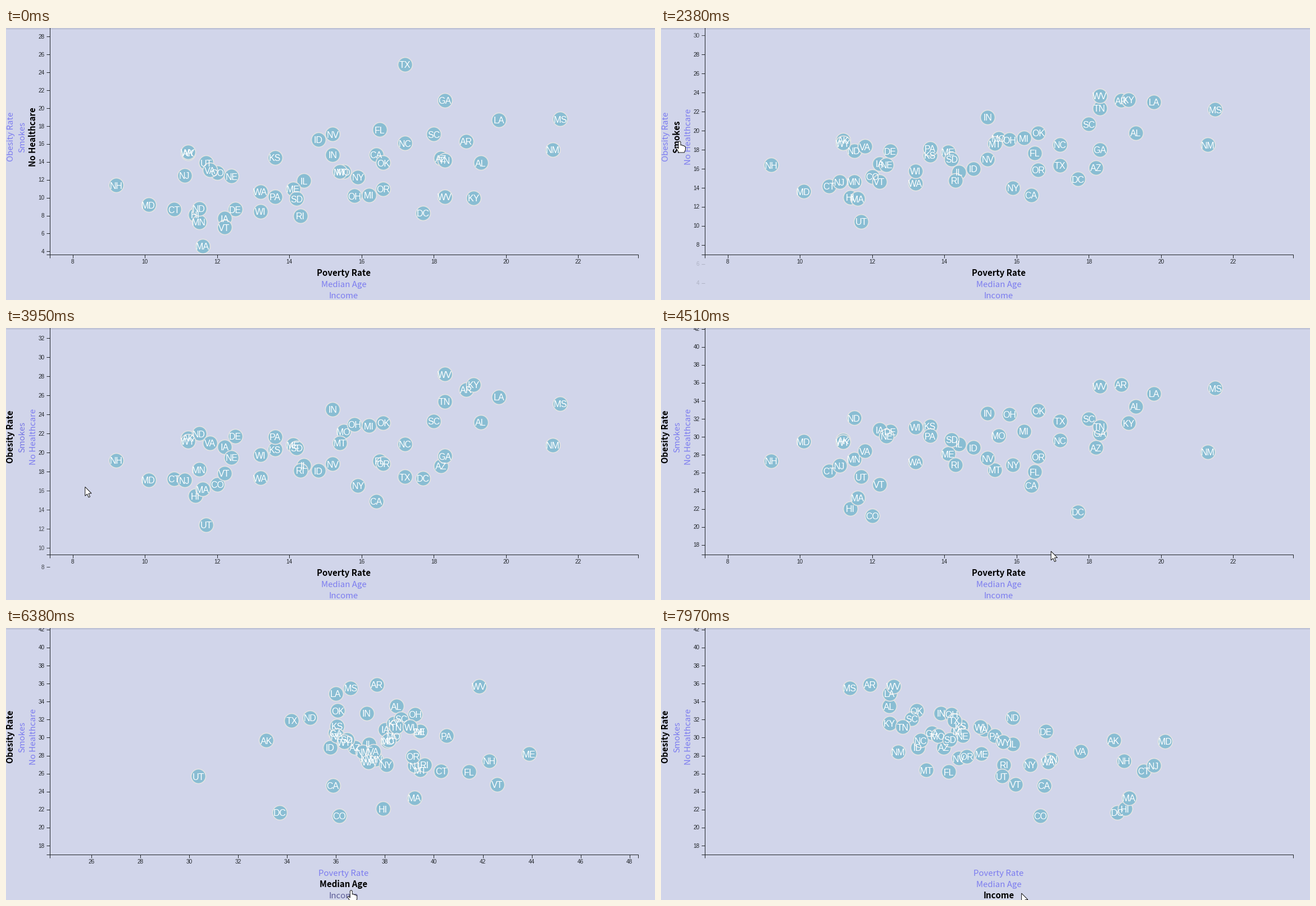
Animation of 1155x485 px, one loop 8000 ms. Source, as a matplotlib script:

```python
import numpy as np
import matplotlib.pyplot as plt
from matplotlib.animation import FuncAnimation
from matplotlib.patches import Polygon

W, H, DPI = 1155, 485, 80
PX = 72 / DPI                      # points per pixel
LOOP, STEP = 8000, 50
DURATION = 1050                    # length of one axis transition
BG, INK, LINK = "#d1d5ea", "#212529", "#7d7df0"
LEFT, RIGHT, BASE, TOP = 77.5, 1124.5, 403.5, -14.5

STATES = ("AL AK AZ AR CA CO CT DE DC FL GA HI ID IL IN IA KS KY LA ME MD MA MI "
          "MN MS MO MT NE NV NH NJ NM NY NC ND OH OK OR PA RI SC SD TN TX UT VT "
          "VA WA WV WI WY").split()

DATA = {
    "poverty": [19.3, 11.2, 18.2, 18.9, 16.4, 12, 10.8, 12.5, 17.7, 16.5, 18.3,
                11.4, 14.8, 14.4, 15.2, 12.2, 13.6, 19.1, 19.8, 14.1, 10.1, 11.6,
                16.2, 11.5, 21.5, 15.5, 15.4, 12.4, 15.2, 9.2, 11.1, 21.3, 15.9,
                17.2, 11.5, 15.8, 16.6, 16.6, 13.6, 14.3, 18, 14.2, 18.3, 17.2,
                11.7, 12.2, 11.8, 13.2, 18.3, 13.2, 11.2],
    "age": [38.6, 33.3, 36.9, 37.8, 36, 36.3, 40.5, 39.6, 33.8, 41.6, 36.1,
            38.1, 35.9, 37.5, 37.4, 38.2, 36.2, 38.5, 36.1, 44.1, 38.3, 39.4,
            39.6, 37.8, 36.7, 38.5, 39.6, 36.2, 37.4, 42.5, 39.4, 37.2, 38.2,
            38.3, 35.1, 39.4, 36.2, 39.3, 40.7, 39.8, 38.8, 36.6, 38.6, 34.3,
            30.5, 42.8, 37.7, 37.5, 42, 39.2, 36.5],
    "income": [42830, 71583, 50068, 41262, 61933, 61303, 70048, 59716, 71648,
               47463, 49321, 69592, 47861, 57444, 49446, 53712, 52504, 42958,
               44555, 49462, 73971, 69160, 49847, 61481, 39680, 48363, 46328,
               52686, 51450, 66532, 71919, 44803, 58878, 46556, 59029, 49308,
               47529, 51075, 53234, 54891, 45238, 50979, 44361, 53035, 60922,
               54166, 64902, 61366, 41059, 52622, 57055],
    "healthcare": [13.9, 15, 14.4, 16.3, 14.8, 12.8, 8.7, 8.7, 8.3, 17.6, 20.9,
                   8.1, 16.5, 11.9, 14.8, 7.7, 14.5, 10, 18.7, 11, 9.2, 4.6,
                   10.3, 7.3, 18.8, 12.9, 12.9, 12.4, 17.1, 11.4, 12.5, 15.4,
                   12.3, 16.1, 8.8, 10.2, 13.9, 11, 10.1, 8, 17.1, 9.9, 14.2,
                   24.9, 13.9, 6.7, 13.1, 10.7, 10.1, 8.5, 15.1],
    "smokes": [21.1, 19.9, 16.5, 24.7, 12.9, 15.7, 15.4, 19.9, 16.4, 17.7, 17.4,
               14.1, 15.9, 16.5, 22.9, 18.5, 18.1, 26.2, 24, 19.3, 14.6, 14.7,
               21.2, 16.3, 23, 20.6, 19.9, 17.3, 17, 17.5, 15.1, 19.2, 14.4,
               19.1, 19.9, 21, 21.1, 17, 19.9, 16.3, 21.5, 18.6, 24.2, 14.5,
               9.7, 16.4, 19.5, 15.3, 26.7, 17.4, 19.5],
    "obesity": [33.5, 29.7, 28.9, 35.9, 24.7, 21.3, 26.3, 30.7, 21.7, 26.2, 30.5,
                22.1, 28.9, 29.3, 32.7, 30.9, 31.3, 31.6, 34.9, 28.2, 29.6, 23.3,
                30.7, 27.6, 35.5, 30.2, 26.4, 30.2, 27.7, 27.4, 26.9, 28.4, 27,
                29.7, 32.2, 32.6, 33, 27.9, 30.2, 27, 32.1, 29.8, 31.2, 31.9,
                25.7, 24.8, 28.5, 27.3, 35.7, 31.2, 29.5],
}
DATA = {key: np.array(column) for key, column in DATA.items()}

AXES = {"x": ("poverty", "age", "income"), "y": ("healthcare", "smokes", "obesity")}
# axis -> (hover time, click time, chosen variable)
CLICKS = {"x": [(5130, 5425, "age"), (6250, 7330, "income")],
          "y": [(1550, 1697, "smokes"), (3420, 3591, "obesity")]}
LABELS = {  # text, anchor, rotation
    "poverty": ("Poverty Rate", (601, 442), 0),
    "age": ("Median Age", (601, 462), 0),
    "income": ("Income", (601, 482), 0),
    "healthcare": ("No Healthcare", (53, 194), 90),
    "smokes": ("Smokes", (33.5, 194), 90),
    "obesity": ("Obesity Rate", (13.5, 194), 90),
}

POINTERS = {
    "arrow": [(0, 0), (0, 16), (3.7, 12.7), (6.3, 18.6), (8.8, 17.5),
              (6.2, 11.7), (11.3, 11.5)],
    "hand": [(-1, 0), (1, 0), (2, 1.5), (2, 7), (4.5, 6.5), (5.5, 8), (7.5, 7.5),
             (8.5, 9), (10, 9), (10.5, 11), (10.5, 15), (8.5, 20), (-1.5, 20),
             (-4, 15.5), (-6.5, 12), (-5.5, 10.5), (-4, 11), (-2, 13), (-2, 1.5)],
    "beam": [(-4, -8), (4, -8), (4, -7), (.6, -6.5), (.6, 6.5), (4, 7), (4, 8),
             (-4, 8), (-4, 7), (-.6, 6.5), (-.6, -6.5), (-4, -7)],
}
PATH = [  # time, x, y, pointer from then on
    (100, 867, 412, "arrow"), (450, 430, 330, "arrow"), (800, 72, 178, "arrow"),
    (930, 72, 180, "arrow"), (1250, 50, 172, "arrow"), (1550, 33, 200, "hand"),
    (1700, 33, 202, "hand"), (2750, 33, 202, "hand"), (2950, 5, 196, "arrow"),
    (3050, -2, 194, "arrow"), (3300, 2, 196, "arrow"), (3420, 8, 200, "hand"),
    (3720, 8, 200, "hand"), (3900, 60, 240, "arrow"), (4230, 470, 460, "arrow"),
    (4510, 694, 398, "arrow"), (4700, 698, 400, "arrow"), (5130, 630, 453, "hand"),
    (5425, 632, 457, "beam"), (6000, 632, 457, "beam"), (6250, 616, 467, "hand"),
    (6380, 614, 468, "hand"), (6700, 601, 474, "hand"), (7000, 602, 474, "hand"),
    (7200, 597, 462, "hand"), (7330, 602, 470, "beam"), (7650, 618, 473, "arrow"),
    (7970, 642, 473, "arrow"),
]
PATH_T, PATH_X, PATH_Y, PATH_KIND = zip(*PATH)


def domain(key):
    pad = 1.1 if key in AXES["x"] else 1.2
    return DATA[key].min() * 0.8, DATA[key].max() * pad


def scale(key, values):
    lo, hi = domain(key)
    start, end = (LEFT, RIGHT) if key in AXES["x"] else (BASE, TOP)
    return start + (end - start) * (np.asarray(values) - lo) / (hi - lo)


def ticks(key):
    step = 5000 if key == "income" else 2
    lo, hi = domain(key)
    return [int(v) for v in np.arange(np.ceil(lo / step) * step, hi, step)]


def cubic(p):
    p = min(max(p, 0), 1)
    return 4 * p ** 3 if p < 0.5 else 1 - 4 * (1 - p) ** 3


def transition(axis, t):
    """Previous variable, current variable and eased progress."""
    old = new = AXES[axis][0]
    progress = 1
    for _, click, key in CLICKS[axis]:
        if t >= click:
            old, new, progress = new, key, cubic((t - click) / DURATION)
    return old, new, progress


def mix(a, b, p):
    p = min(max(p, 0), 1)
    a, b = (np.array([int(c[i:i + 2], 16) for i in (1, 3, 5)]) for c in (a, b))
    return tuple((a + (b - a) * p) / 255)


fig = plt.figure(figsize=(W / DPI, H / DPI), dpi=DPI, facecolor=BG)
ax = fig.add_axes([0, 0, 1, 1])
ax.set(xlim=(0, W), ylim=(H, 0))
ax.axis("off")


def line(xs, ys, color=INK, z=2):
    return ax.plot(xs, ys, color=color, lw=PX, zorder=z, solid_capstyle="butt")[0]


def text(x, y, s, size, color, **kw):
    kw = {"ha": "center", "va": "baseline", "family": "Liberation Sans", **kw}
    return ax.text(x, y, s, fontsize=size * PX, color=color, **kw)


line([0, W], [0.5, 0.5], "#a9acc0")
line([LEFT, LEFT, RIGHT, RIGHT], [BASE + 6, BASE, BASE, BASE + 6])
line([LEFT - 6, LEFT, LEFT], [BASE, BASE, -2])

marks = {"x": {}, "y": {}}
for axis, keys in AXES.items():
    for value in sorted({v for key in keys for v in ticks(key)}):
        label = text(0, 419.6, f"{value:,}", 10, INK,
                     ha="center" if axis == "x" else "right")
        marks[axis][value] = line([0, 0], [0, 0]), label

names = {key: text(*pos, s, 15, LINK, family="Noto Sans CJK JP", rotation=turn,
                   rotation_mode="anchor", zorder=3)
         for key, (s, pos, turn) in LABELS.items()}

dots = ax.scatter(np.zeros(len(STATES)), np.zeros(len(STATES)), s=(26 * PX) ** 2,
                  c="#89bdd3", edgecolors="#e3e3e3", linewidths=1.7 * PX, zorder=4)
codes = [text(0, 0, s, 16, "white", zorder=5) for s in STATES]

pointers = {kind: Polygon(shape, closed=True, fc="black" if kind == "beam" else "white",
                          ec="white" if kind == "beam" else "black",
                          lw=(0.4 if kind == "beam" else 0.9) * PX, zorder=9)
            for kind, shape in POINTERS.items()}
for patch in pointers.values():
    ax.add_patch(patch)


def draw_ticks(axis, old, new, p):
    before, after = ticks(old), ticks(new)
    for value, (mark, label) in marks[axis].items():
        pos = (1 - p) * scale(old, value) + p * scale(new, value)
        alpha = (1 - p) * (value in before) + p * (value in after)
        shown = alpha > 0.01 and -20 < pos < W + 20
        mark.set_visible(shown)
        label.set_visible(shown)
        if not shown:
            continue
        if axis == "x":
            mark.set_data([pos, pos], [BASE, BASE + 6])
            label.set_x(pos)
        else:
            mark.set_data([LEFT - 6, LEFT], [pos, pos])
            label.set_position((LEFT - 9, pos + 3.5))
        mark.set_alpha(alpha)
        label.set_alpha(alpha)


def draw_labels(axis, active, t):
    for key in AXES[axis]:
        names[key].set(color="black" if key == active else LINK,
                       weight="bold" if key == active else 300)
    previous = AXES[axis][0]
    for hover, click, key in CLICKS[axis]:
        if hover <= t < click:
            names[key].set_color(mix(LINK, "#444455", (t - hover) / 200))
        if click <= t < click + 400:
            names[previous].set_color(mix("#222233", LINK, (t - click) / 400))
        previous = key


def draw_pointer(t):
    now = None
    for start, kind in zip(PATH_T, PATH_KIND):
        if t >= start:
            now = kind
    tip = np.interp(t, PATH_T, PATH_X), np.interp(t, PATH_T, PATH_Y)
    for kind, patch in pointers.items():
        patch.set_visible(kind == now)
        patch.set_xy(np.array(POINTERS[kind]) + tip)


def draw(frame):
    t = frame * STEP + 15
    spots = []
    for axis in "xy":
        old, new, p = transition(axis, t)
        spots.append((1 - p) * scale(old, DATA[old]) + p * scale(new, DATA[new]))
        draw_ticks(axis, old, new, p)
        draw_labels(axis, new, t)
    dots.set_offsets(np.column_stack(spots))
    for code, x, y in zip(codes, *spots):
        code.set_position((x, y + 6.3))
    draw_pointer(t)
    return []


anim = FuncAnimation(fig, draw, frames=LOOP // STEP, interval=STEP,
                     init_func=lambda: draw(0), repeat=True, repeat_delay=0)
plt.show()
```
